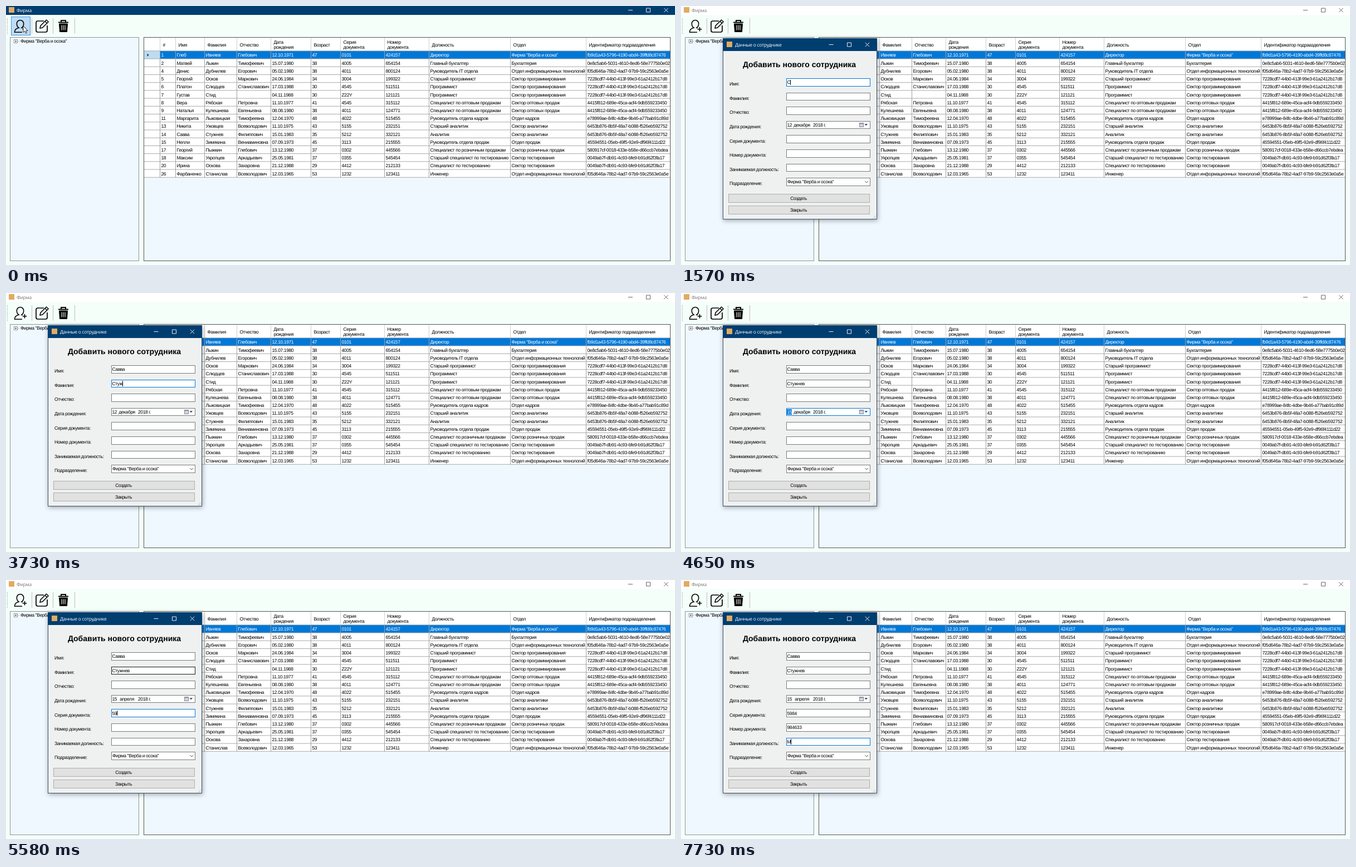
Animation, 1201 px wide and 466 px high, one loop 8 s. Source, as an HTML page:

```html
<!DOCTYPE html>
<html lang="ru">
<head>
<meta charset="utf-8">
<title>Фирма</title>
<style>
html, body { margin: 0; width: 100%; height: 100%; overflow: hidden; background: #f5fffa; }
svg { display: block; width: 1201px; height: 466px; }
text { font: 8.5px "Liberation Sans", Arial, sans-serif; letter-spacing: -.39px; text-rendering: geometricPrecision; white-space: pre; }
.ui { font: 8.5px "Open Sans", "Noto Sans", sans-serif; letter-spacing: -.3px; }
.head { font: bold 14px "Liberation Sans", Arial, sans-serif; letter-spacing: 0; }
.mid { text-anchor: middle; }
rect, .crisp { shape-rendering: crispEdges; }
.dialog { filter: drop-shadow(1px 2px 4px rgba(0, 0, 0, .35)); }
</style>
</head>
<body>
<svg id="stage" viewBox="0 0 1201 466"></svg>
<script>
const LOOP = 8000;
const NAVY = '#003e70', BLUE = '#0078d7', GREY = '#7a7a7a', FIRM = 'Фирма "Верба и осока"';

const rect = (x, y, w, h, fill, stroke = 'none') =>
  `<rect x="${x}" y="${y}" width="${w}" height="${h}" fill="${fill}" stroke="${stroke}"/>`;
const text = (x, y, s, fill = '#000', attrs = '') => `<text x="${x}" y="${y}" fill="${fill}" ${attrs}>${s}</text>`;
const path = (d, stroke = '#000', width = 1, fill = 'none', attrs = '') =>
  `<path d="${d}" stroke="${stroke}" stroke-width="${width}" fill="${fill}" ${attrs}/>`;
const crisp = (d, stroke) => path(d, stroke, 1, 'none', 'class="crisp"');
const cursor = (x, y) => path(`M${x} ${y}v11.4l2.7 -2.4 1.9 4.2 1.8 -.8 -1.8 -4h3.6z`, '#000', .8, '#fff');
const appIcon = (x, y) => rect(x, y, 10, 10, '#e0ab62');
const captionButtons = (x, y, gap, color) =>
  path(`M${x - 4} ${y}h8M${x + gap - 3.5} ${y - 3.5}h7v7h-7zM${x + 2 * gap - 3.7} ${y - 3.7}l7.4 7.4m0 -7.4l-7.4 7.4`, color, .9);

const columns = [
  [276.5, '#'], [304.5, 'Имя'], [356.5, 'Фамилия'], [414.5, 'Отчество'], [475.5, 'Дата|рождения'],
  [547.5, 'Возраст'], [600.5, 'Серия|документа'], [679.5, 'Номер|документа'], [759.5, 'Должность'],
  [905.5, 'Отдел'], [1041.5, 'Идентификатор подраазделения']
];

const units = {
  firm: [FIRM, 'fb9d1a43-5796-4190-abd4-39ffd8c87476'],
  books: ['Бухгалтерия', '0e8c5ab6-5031-4610-8ed6-58e7775b0e02'],
  it: ['Отдел информационных технологий', 'f05d646a-78b2-4ad7-97b9-59c2563e0a5e'],
  code: ['Сектор программирования', '7228cdf7-44b0-413f-99e3-61a2412b17d8'],
  bulk: ['Сектор оптовых продаж', '4415f812-689e-45ca-acf4-9db559233450'],
  staff: ['Отдел кадров', 'e78999ae-84fc-4dbe-9b46-a77bab91c89d'],
  study: ['Сектор аналитики', '6453b876-8b5f-48a7-b088-f526eb592752'],
  sales: ['Отдел продаж', '45594551-05eb-49f5-92e9-df96f4111d22'],
  retail: ['Сектор розничных продаж', '580917cf-0018-433e-b58e-d66ccb7ebdea'],
  test: ['Сектор тестирования', '0049ab7f-db91-4c93-bfe9-b91d62f3fa17']
};

const people = `1|Глеб|Ивняев|Глебович|12.10.1971|47|0101|424157|Директор|firm
2|Матвей|Лыкин|Тимофеевич|15.07.1980|38|4005|654154|Главный бухгалтер|books
4|Денис|Дубнилев|Егорович|05.02.1980|38|4011|800124|Руководитель IT отдела|it
5|Георгий|Осков|Маркович|24.06.1984|34|3004|199322|Старший программист|code
6|Платон|Слюдцев|Станиславович|17.03.1988|30|4545|511511|Программист|code
7|Густав|Стид||04.11.1988|30|Z22Y|121121|Программист|code
8|Вера|Рябская|Петровна|11.10.1977|41|4545|315112|Специалист по оптовым продажам|bulk
9|Наталья|Кулешнева|Евгеньевна|08.08.1980|38|4011|124771|Специалист по оптовым продажам|bulk
11|Маргарита|Лыковицкая|Тимофеевна|12.04.1970|48|4022|515455|Руководитель отдела кадров|staff
13|Никита|Ужовцев|Всеволодович|11.10.1975|43|5155|232151|Старший аналитик|study
14|Савва|Стужнев|Филиппович|15.01.1983|35|5212|332121|Аналитик|study
15|Нелли|Зимякина|Вениаминовна|07.09.1973|45|3113|215555|Руководитель отдела продаж|sales
17|Георгий|Пыжкин|Глебович|13.12.1980|37|0302|445566|Специалист по розничным продажам|retail
18|Максим|Укропцев|Аркадьевич|25.05.1981|37|0355|545454|Старший специалист по тестированию|test
20|Ирина|Оскова|Захаровна|21.12.1988|29|4412|212133|Специалист по тестированию|test
26|Фарбаненко|Станислав|Всеволодович|12.03.1965|53|1232|123411|Инженер|it`
  .split('\n').map(row => row.split('|')).map(row => [...row.slice(0, 9), ...units[row[9]]]);

function table() {
  const top = 81, pitch = 14.22, bottom = top + pitch * people.length;
  let s = rect(247.5, 56.5, 945, 402, '#f0f8ff', '#555') + rect(248, 57, 944, bottom - 57, '#fff') +
    rect(248, top, 28, pitch, '#bcdcf4') + rect(276, top, 916, pitch, BLUE);
  let rules = `M248 ${top - .2}H1192`;
  for (let i = 1; i <= people.length; i++) rules += `M248 ${top + pitch * i - .2}H1192`;
  s += crisp(columns.map(([x]) => `M${x} 57V${top}`).join(''), '#d0d0d0') + path(rules, '#a0a0a0', .9) +
    crisp(columns.map(([x]) => `M${x} ${top}V${bottom}`).join(''), '#a0a0a0');
  s += path('M253.5 85.5l3 2.7 -3 2.7z', 'none', 0, '#333');
  columns.forEach(([x, label], c) => {
    const parts = label.split('|');
    parts.forEach((part, i) => s += text(x + 5, parts[1] ? 67.5 + 9.8 * i : 73.1, part));
    people.forEach((row, r) => s += text(x + 2, 91.4 + pitch * r, row[c], r ? '#000' : '#fff'));
  });
  return s;
}

function icons() {
  const user = path('M25.5 25.5c-3.7 0 -6.2 2.8 -6.2 6.3c0 3.2 1.4 6 3.6 7.4c-4.5 1 -7.4 4 -7.4 8H29' +
    'M25.5 25.5c3.7 0 6.2 2.8 6.2 6.3c0 3.2 -1.4 6 -3.6 7.4l1.6 .5M33.5 38v7.5M29.7 41.7h7.5', '#000', 1.6);
  const pen = path('M68 27H57q-3 0 -3 3V44q0 3 3 3H71q3 0 3 -3V35', '#000', 1.7) +
    path('M61 40l1 -4.5L72.5 25l3.5 3.5L65.5 39zM70 27.5l3.5 3.5', '#000', 1.5);
  const bin = path('M94 29.5h18M99 29v-3h8v3', '#000', 2) +
    path('M95.5 32h15l-1 14.5h-13z', '#000', 1, '#000') + path('M100 34.5v9M103 34.5v9M106 34.5v9', '#fff', 1.1);
  return user + pen + bin;
}

const tableArt = table(), iconArt = icons();

function mainWindow(active) {
  const ink = active ? '#fff' : '#777';
  return rect(0, 0, 1201, 466, '#f5fffa') + rect(0, 0, 1201, 16, active ? NAVY : '#fff') +
    appIcon(5, 2) + text(19, 11, 'Фирма', ink, 'class="ui"') +
    captionButtons(1121, 7.5, 32, active ? '#fff' : '#555') +
    path('M2.5 22V51', '#a0a8a6', 1.2, 'none', 'stroke-dasharray="1.2 1.4"') +
    crisp('M46.5 22V50M84.5 22V50M123.5 22V50', '#bdbdbd') +
    (active ? rect(9.5, 19.5, 34, 33, '#bfdcf5', '#3a94dd') : '') + iconArt +
    rect(7.5, 56.5, 231, 402, '#f0f8ff', '#8d949c') +
    rect(14.5, 60.5, 6, 6, '#fff', '#919191') + path('M16 63.5h3M17.5 62v3', '#333', .8) +
    path('M21 63.5h4', '#999', 1, 'none', 'stroke-dasharray="1 1"') + text(26, 66.4, FIRM) + tableArt;
}

const labels = ['Имя', 'Фамилия', 'Отчество', 'Дата рождения', 'Серия документа', 'Номер документа',
  'Занимаемая должность', 'Подразделение'];
const entered = ['Савва', 'Стужнев', '', '', '5984', '984633', ''];

// start time, focused field, text typed so far
const steps = [
  [0], [1250, 0, ''], [1570, 0, 'С'], [1870, 0, 'Сав'], [2180, 0, 'Савва'],
  [2790, 1, 'С'], [3110, 1, 'Ст'], [3430, 1, 'Сту'], [3730, 1, 'Стуж'],
  [4040, 3], [4650, 3], [4970, 3], [5270, 3],
  [5580, 4, '59'], [5880, 4, '598'], [6200, 5, '9'], [6500, 5, '984'], [6810, 5, '9846'],
  [7120, 5, '98463'], [7430, 5, '984633'], [7730, 6, 'М']
];

function dateField(y, time, focused) {
  const month = time >= 4970;
  const part = (x, w, s, selected) => (selected ? rect(x - w / 2, y + 2.5, w, 10, BLUE) : '') +
    text(x, y + 10.2, s, selected ? '#fff' : '#000', 'class="mid"');
  return part(194.8, 9, time < 4650 ? '12' : '15', focused && !month) +
    part(217, 31, month ? 'апреля' : 'декабря', focused && month) + text(237, y + 10.2, '2018 г.') +
    rect(320.5, y + 3.5, 7, 7, '#d9d3de', '#8c8794') + path(`M321 ${y + 5}h6`, '#8c8794') +
    path(`M329.5 ${y + 5.5}h5.5l-2.75 3z`, 'none', 0, '#22386b');
}

function field(i, time, focus, typed) {
  const y = 130 + 25.6 * i, focused = i === focus;
  const hovered = i === 1 && time >= 5580 && time < 7730;
  const border = focused ? BLUE : hovered ? '#171717' : GREY;
  const s = text(87, y + 13.2, labels[i] + ':') + rect(189.5, y + .5, 150, 13.6, '#fff', border);
  if (i === 3) return s + dateField(y, time, focused);
  if (i === 7) return s + text(191, y + 10.2, FIRM) + path(`M330.5 ${y + 6}l2.7 2.7 2.7 -2.7`, '#444');
  if (!focused) return s + text(190.5, y + 10.2, i < focus ? entered[i] : '');
  return s + text(190.5, y + 10.2, typed, '#000', 'id="typed"') +
    `<path id="caret" class="crisp" d="M0 ${y + 2.5}v9.5" stroke="#000"/>`;
}

const button = (y, s) => rect(85.5, y, 253, 14.5, '#e1e1e1', '#adadad') + text(211, y + 10.3, s, '#000', 'class="mid"');

function dialog(time, focus, typed) {
  const opening = time < 1570;
  const look = opening ? 'opacity=".7" transform="translate(213.5 221) scale(.983) translate(-213.5 -221)"' : '';
  return `<g class="dialog" ${look}>` + rect(75.5, 58.5, 276, 325, '#eff1f1', '#34506a') + rect(75, 58, 277, 23, NAVY) +
    appIcon(82, 64) + text(97, 72.7, 'Данные о сотруднике', '#fff', 'class="ui"') +
    captionButtons(269.5, 69.5, 32.5, '#fff') +
    text(212.5, 109.5, 'Добавить нового сотрудника', '#000', 'class="head mid"') +
    labels.map((_, i) => field(i, time, focus, typed)).join('') +
    button(338.8, 'Создать') + button(359.5, 'Закрыть') +
    path('M344.5 381.5h5M346.5 379.5h3M348.5 377.5h1', '#aaa', 1, 'none', 'stroke-dasharray="1 1"') + '</g>';
}

function pointer(time) {
  if (time === 0) return cursor(31, 36);
  if (time === 1250) return cursor(81.5, 86.5);
  if (time === 4970) return cursor(224, 215.5);
  return time === 5270 ? cursor(241, 215.5) : '';
}

const stage = document.getElementById('stage');
let shown;

function draw() {
  const now = performance.now() % LOOP;
  const step = steps.findLast(([start]) => start <= now);
  if (step !== shown) {
    shown = step;
    const [time, focus, typed] = step;
    stage.innerHTML = mainWindow(!time) + (time ? dialog(time, focus, typed) : '') + pointer(time);
    const caret = document.getElementById('caret');
    if (caret) {
      const width = document.getElementById('typed').getComputedTextLength();
      caret.setAttribute('transform', `translate(${Math.floor(191 + width) + .5} 0)`);
    }
  }
  requestAnimationFrame(draw);
}
draw();
</script>
</body>
</html>
```
